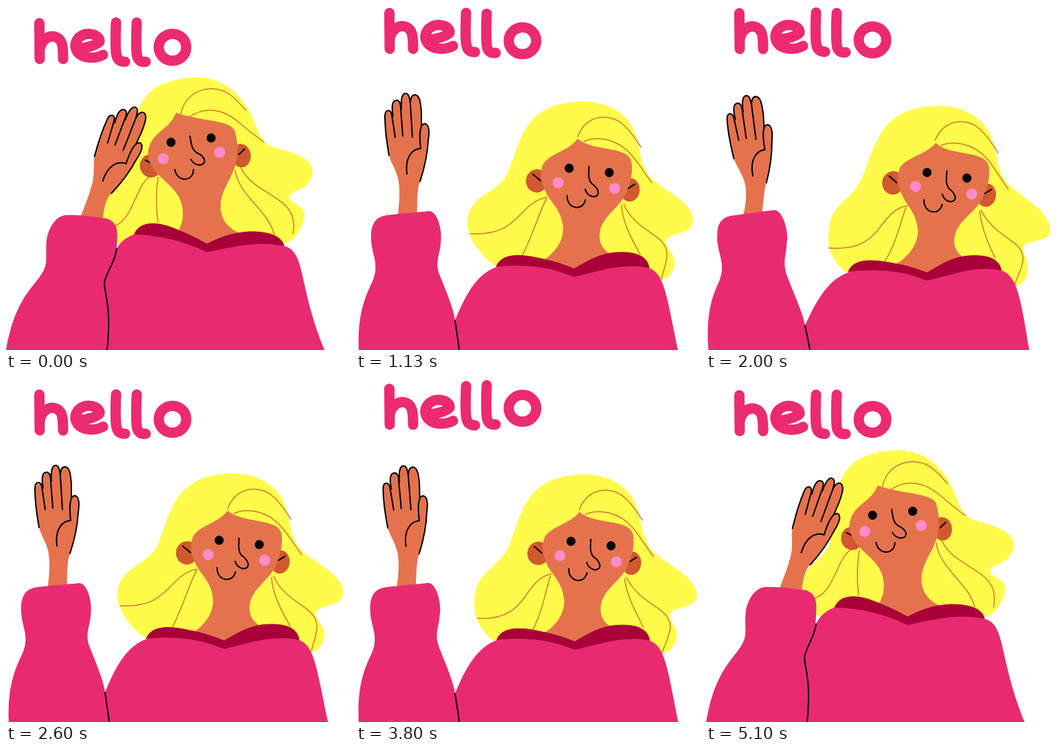
Write an HTML page that moves like this. It is 500 px wide and 500 px high and loops after 5130 ms.

```html
<!DOCTYPE html>
<html lang="en">
<head>
<meta charset="utf-8">
<title>hello</title>
<style>
  html, body { margin: 0; width: 100%; height: 100%; overflow: hidden; background: #fff; }
  svg { display: block; width: 100%; height: 100%; }
  .line { fill: none; stroke: #000; stroke-width: 2; stroke-linecap: round; stroke-linejoin: round; }
  .strand { fill: none; stroke: #d27a28; stroke-width: 1.5; stroke-linecap: round; }
  .word { fill: none; stroke: #ec2a72; stroke-width: 15; stroke-linecap: round; stroke-linejoin: round; }
  .skin { fill: #e4734d; }
  .ear { fill: #d0592f; }
  .pink { fill: #ea2a70; }
  .cheek { fill: #ff8bcb; }
  #collar { fill: #a90039; stroke: #a90039; }
</style>
</head>
<body>
<svg viewBox="0 0 500 500" role="img" aria-label="hello">
  <path id="hair" fill="#fffb4a"/>
  <g id="strands"></g>
  <g id="earsBox">
    <g id="earL">
      <ellipse class="ear" rx="16" ry="17"/>
      <path class="line" d="M-7 -9 L5 -1"/>
    </g>
    <g id="earR">
      <ellipse class="ear" rx="14" ry="17"/>
      <path class="line" d="M-3 -2 L6 -9"/>
    </g>
  </g>
  <path id="skin" class="skin"/>
  <g id="face">
    <circle cx="-29.3" r="6.6"/>
    <circle cx="29.3" r="6.6"/>
    <circle class="cheek" cx="-43" cy="22.5" r="8"/>
    <circle class="cheek" cx="39.5" cy="22" r="8"/>
    <path class="line" d="M-1 -6 C0 5 -1 13 6 19 C14 23 19 31 15 35 C10 40 0 36 -3 28"/>
    <path class="line" d="M-28 40 C-27 59 -3 61 -1 43"/>
  </g>
  <path id="collar"/>
  <path id="torso" class="pink"/>
  <path id="forearm" class="skin"/>
  <g id="hand">
    <path class="skin" d="M48 217 C45 200 42 175 42 160 C42 150 51 149 54 158 C51 145 53 137 59 137 C65 137 66 145 66 150 C65 135 67 127 72 127 C78 127 79 134 79 142 C79 134 81 129 86 129 C92 130 94 138 95 155 L95 178 C96 172 98 170 101 171 C106 173 107 180 105 195 C104 215 98 240 93 255 L90 264 L63 264 C62 242 52 232 48 217Z"/>
    <path class="line" d="M48 217 C45 200 42 175 42 160 C42 150 50 149 52 158 L57 191 M54 160 C51 145 53 137 59 137 C64 137 65 145 65 150 L68 189 M66 150 C65 135 67 127 72 127 C77 127 78 134 79 142 L82 191 M79 142 C79 134 81 129 86 129 C92 130 94 138 95 155 L95 174 M74 244 C71 222 80 208 94 207 C92 190 92 171 100 171 C106 172 107 182 105 195 C104 215 98 240 93 255"/>
  </g>
  <path id="sleeve" class="pink"/>
  <path id="seam" class="line"/>
  <g id="word" class="word"></g>
</svg>
<script>
const LOOP = 5130, WAVE = LOOP / 3, HOP = LOOP / 6;
const $ = id => document.getElementById(id);

// Poses: hand by the ear, (on the way,) arm out
const shapes = {
  hair: [
    'M186 352 C160 350 132 330 135 305 C140 270 175 265 180 235 C186 200 178 140 222 116 C270 95 318 100 345 140 C365 165 362 190 385 204 C415 212 446 220 446 242 C440 275 405 265 413 282 C420 290 434 290 434 305 C430 330 415 345 400 346 L400 345 L292 345Z',
    'M200 363 C170 350 142 318 150 292 C158 262 190 262 206 232 C220 195 222 150 270 132 C315 119 352 125 375 152 C394 175 385 215 412 236 C435 252 477 260 477 282 C474 312 440 308 438 320 C437 332 456 338 456 350 C454 366 445 376 434 379 L419 375 L310 380Z',
    'M207 380 C180 365 156 330 163 305 C170 275 203 272 219 246 C236 210 238 163 288 145 C330 133 370 138 394 165 C416 190 407 228 430 251 C450 270 490 285 490 312 C488 335 452 328 450 342 C450 352 464 360 463 375 C461 390 452 398 443 398 L426 382 L320 385Z'],
  skin: [
    'M247 155 C240 175 222 180 212 196 C205 208 206 215 208 225 C220 255 255 262 257 298 C258 318 250 330 240 338 L292 355 L345 332 C322 325 311 308 312 290 C313 265 330 250 335 225 C338 205 336 195 332 180 C322 165 285 168 247 155Z',
    'M322 193 C310 210 282 214 272 230 C268 240 268 250 271 258 C278 285 298 290 301 322 C302 340 290 360 268 372 L317 392 L385 366 C365 362 354 350 354 335 C354 305 385 295 394 268 C402 250 402 235 400 225 C394 203 345 212 322 193Z'],
  collar: [
    'M186 333 C192 316 212 312 238 321 C262 330 278 338 292 346 C308 338 325 330 355 328 C385 328 402 336 404 349 C365 341 330 350 292 358 C258 342 225 333 186 333Z',
    'M204 379 C210 362 232 360 258 365 C285 370 300 375 317 382 C335 372 355 358 385 358 C410 358 424 365 426 381 C390 373 355 385 317 394 C280 378 240 375 204 379Z'],
  torso: [
    'M161 353 C166 342 176 336 186 332 C225 333 258 342 292 358 C330 350 365 341 404 349 C436 356 424 405 463 500 L147 500 C153 440 145 425 143 404 C143 390 158 375 161 353Z',
    'M144 441 C156 405 170 372 199 362 C235 361 270 366 309 383 C342 374 390 366 419 374 C440 382 438 410 464 500 L148 500 C147 490 147 480 146 470 C145 460 145 450 144 441Z',
    'M144 457 C157 425 174 389 205 379 C240 375 280 378 317 394 C355 385 390 373 426 381 C448 389 451 418 468 500 L150 500 C149 492 148 485 147 478 C146 470 145 465 144 457Z'],
  sleeve: [
    'M0 500 C8 455 20 430 40 405 C66 375 56 372 59 340 C62 322 72 306 86 304 C108 303 130 307 147 309 C162 315 163 325 161 350 C161 351 161 352 161 353 C160 372 143 390 143 404 C145 425 153 440 147 500Z',
    'M5 500 C6 450 22 425 34 400 C48 375 32 360 34 330 C38 312 44 306 56 303 C82 301 102 303 122 301 C136 304 137 330 135 345 C132 365 122 372 130 390 C138 405 143 425 144 441 C146 460 147 480 148 500Z',
    'M4 500 C2 450 12 425 24 400 C36 372 20 360 22 330 C24 312 32 306 45 304 C70 301 90 300 107 298 C120 300 126 330 123 345 C122 362 114 372 122 392 C130 412 142 440 144 457 C146 472 148 485 150 500Z'],
  seam: [
    'M161 353 C158 375 143 390 143 404 C145 425 153 440 147 500',
    'M144 441 C145 450 145 460 146 470 C147 480 147 490 148 500',
    'M144 457 C145 465 146 470 147 478 C148 485 149 492 150 500']
};

const strands = [
  ['M254 157 C262 118 305 112 327 130 C335 136 342 144 349 152', 'M322 190 C335 157 368 155 388 172 C398 181 406 192 414 205'],
  ['M265 162 C290 144 318 150 342 172 C355 183 365 191 375 198', 'M331 197 C350 188 380 193 400 216 C412 230 421 245 430 257'],
  ['M209 248 C188 262 186 308 158 320', 'M278 278 C235 285 240 335 166 331'],
  ['M221 249 C218 270 218 295 221 314', 'M277 280 C268 295 258 330 242 362'],
  ['M333 238 C337 275 380 295 390 332', 'M386 290 C388 320 405 345 413 361'],
  ['M341 234 C355 268 405 275 416 305 C419 315 419 322 417 331', 'M389 288 C408 330 450 330 452 360 C452 375 446 385 444 397']
];

// [strokes, delay ms, rise, dip]
const letters = [
  ['M48.500 25 L49 77 M49 63 C52 47 64 42 72 45 C82 48 83 58 83 77', -12, -15, 5],
  ['M104 62 C118 61 131 57 136 52 C137 43 124 39 115 41 C102 45 97 57 104 67 C112 77 130 77 141 71', 15, -13, 7],
  ['M160 24 C159 45 159 58 160 68 C161 78 166 81 173 81', 50, -15, 10],
  ['M190 24 C189 45 189 58 190 70 C191 79 196 82 203 81', 70, -15, 11],
  ['M222 60 A20 19.500 0 1 1 262 60 A20 19.500 0 1 1 222 60', 125, -16, 6]
];

const add = (parent, cls) => {
  const el = document.createElementNS('http://www.w3.org/2000/svg', 'path');
  el.setAttribute('class', cls);
  return parent.appendChild(el);
};
const strandEls = strands.map(() => add($('strands'), 'strand'));
const letterEls = letters.map(([d]) => {
  const el = add($('word'), 'word');
  el.setAttribute('d', d);
  return el;
});

const mix = (a, b, u) => a + (b - a) * u;
const smooth = u => u * u * (3 - 2 * u);
const same = u => u;
const clamp = u => Math.min(1, Math.max(0, u));

// Value at x on a list of [x, value] knots
function track(knots, x, ease = smooth) {
  if (x <= knots[0][0]) return knots[0][1];
  for (let i = 1; i < knots.length; i++) {
    const [x0, a] = knots[i - 1], [x1, b] = knots[i];
    if (x < x1) return mix(a, b, ease((x - x0) / (x1 - x0)));
  }
  return knots[knots.length - 1][1];
}

const swing = [[25, 0], [268, 1.17], [430, 1], [1345, 1], [1722, 0]];
const lag = [[190, 0], [285, 1], [375, 0.95], [480, 0]];
const MID = 0.66;

const nums = d => d.match(/-?[\d.]+/g).map(Number);
function blend(poses, p) {
  if (poses.length === 2) {
    const [a, b] = poses.map(nums);
    return a.map((v, i) => mix(v, b[i], p));
  }
  const [a, m, b] = poses.map(nums);
  return p < MID
    ? a.map((v, i) => mix(v, m[i], p / MID))
    : m.map((v, i) => mix(v, b[i], (p - MID) / (1 - MID)));
}

function setPath(el, poses, p, q = 0) {
  const v = blend(poses, p);
  if (q) {
    // trailing hair: free between crown and collar, mostly on the left
    for (let i = 0; i < v.length; i += 2) {
      const y = v[i + 1], left = v[i] < 300;
      const w = q * clamp(Math.min((y - 260) / 60, (400 - y) / 50));
      v[i] += w * (left ? 11 : 5);
      if (left) v[i + 1] += w * 19;
    }
  }
  let i = 0;
  el.setAttribute('d', poses[0].replace(/-?[\d.]+/g, () => v[i++].toFixed(2)));
}

const place = (el, x, y, r = 0) =>
  el.setAttribute('transform', `translate(${x.toFixed(2)} ${y.toFixed(2)}) rotate(${r.toFixed(2)})`);

const knots = (a, b, c, d) => [[0, a], [MID, b], [1, c], [1.17, d]];
const wristX = knots(134, 98, 75, 70);
const wristY = knots(271, 265, 262, 265);
const wristTurn = knots(25, -2, 0, -4);
const cuff = ['M106 312 L141 316', 'M75 310 L106 310', 'M60 310 L89 308'];

function drawArm(p) {
  const [x, y, turn] = [wristX, wristY, wristTurn].map(k => track(k, p, same));
  $('hand').setAttribute('transform', `translate(${x} ${y}) rotate(${turn}) translate(-75 -262)`);
  const c = Math.cos(turn * Math.PI / 180), s = Math.sin(turn * Math.PI / 180);
  const at = (dx, dy) => `${x + dx * c - dy * s} ${y + dx * s + dy * c}`;
  const [lx, ly, rx, ry] = blend(cuff, p);
  $('forearm').setAttribute('d',
    `M${at(-13, -10)} Q${at(-10, 12)} ${lx} ${ly} L${rx} ${ry} Q${at(13, 12)} ${at(17, -8)}Z`);
}

function draw(time) {
  const t = time % LOOP, w = t % WAVE, h = t % HOP;
  const p = track(swing, w), q = track(lag, w);

  for (const id in shapes) setPath($(id), shapes[id], p, id === 'hair' ? q : 0);
  strands.forEach((s, i) => setPath(strandEls[i], s, p, q));

  const x = mix(269, 339, p), y = mix(195, 239, p), turn = mix(-6, 6, p);
  place($('face'), x, y, turn);
  place($('earsBox'), x, y, turn);
  place($('earL'), mix(-62, -74, p), mix(31, 23, p));
  place($('earR'), mix(70, 62, p), mix(30, 22, p));
  drawArm(p);

  letters.forEach(([, delay, rise, dip], i) => {
    const dy = track([[Math.max(0, delay), 0], [delay + 270, rise], [605 + delay / 4, dip], [845, 0]], h);
    place(letterEls[i], 0, dy);
  });
}

function tick() {
  draw(performance.now());
  requestAnimationFrame(tick);
}
tick();
</script>
</body>
</html>
```
